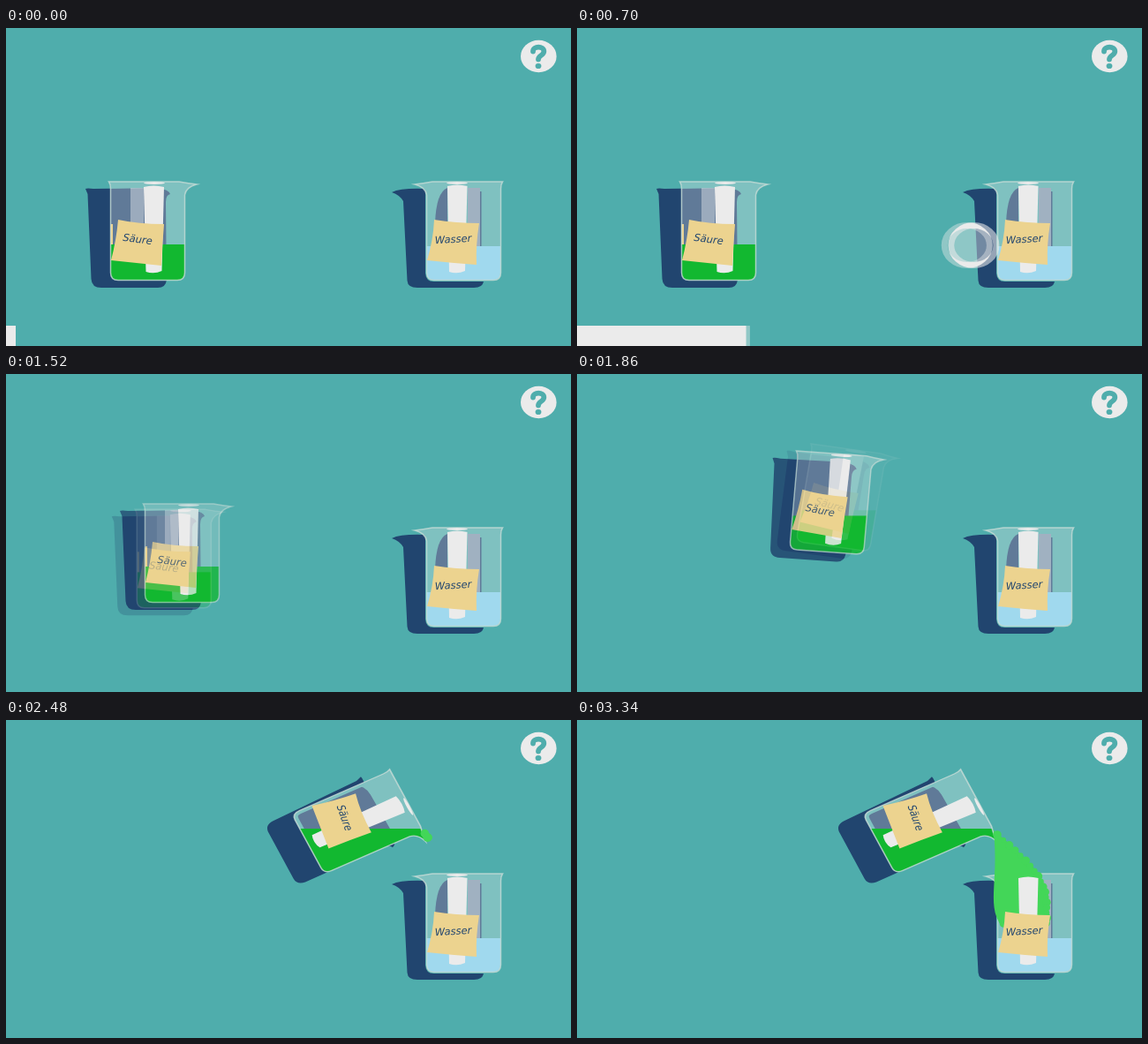
These frames come from a looping animation (640 px wide and 360 px high, 3460 ms). An HTML page with a canvas:

```html
<!DOCTYPE html>
<html lang="de">
<head>
<meta charset="utf-8">
<title>Säure und Wasser</title>
<style>
html, body { margin: 0; width: 100%; height: 100%; overflow: hidden; background: #4fadac; }
canvas { display: block; width: 100vw; height: 100vh; }
</style>
</head>
<body>
<canvas id="stage" width="640" height="360"></canvas>
<script>
const W = 640, H = 360, LOOP = 3460;
const BG = '#4fadac', NAVY = '#21456f', SLATE = '#607a98', PAPER = '#ecd38f', WHITE = '#ebebeb';
const ACID = '#12b830', POUR = '#43d658', WATER = '#a0d9ee';
const GLASS = '#7fc1c0', EDGE = 'rgba(205,222,217,.75)';
const STRETCH = 1.115;

const ctx = document.getElementById('stage').getContext('2d');
const layer = document.createElement('canvas');
layer.width = W;
layer.height = H;
const blend = layer.getContext('2d');

// The picture advances in steps of 70 ms with a few longer holds.
const holds = { 15: 130, 18: 130, 20: 130, 28: 130, 34: 130, 38: 120, 40: 120, 42: 120 };
const ticks = [0];
for (let i = 0; i < 42; i++) ticks.push(ticks[i] + (holds[i] || 70));

const glass = new Path2D('M116.500 174 L196 174 Q207 176 216 177 Q204 180 202.500 189 L202.500 277 Q202.500 285.500 194 285.500 L127 285.500 Q118.500 285.500 118.500 277 L118.500 182 Q118.500 177 116.500 174Z');
const shade = new Path2D('M115 173 Q117 172 124 173 L196 172 Q210 174 211 179 Q206 180 206 188 L207 276 Q206 285 197 285 L133 285 Q122 285 121.500 275 L117.500 179Z');
const innerShade = new Path2D('M118 196 Q120 174 140 173 L196 172 Q210 174 211 179 Q206 180 206 188 L207 285 L122 285Z');
const waterShade = new Path2D('M437 186 Q447 181 475 182 L475 278 Q476 287 484 287 L541 287 Q540 294 530 294 L466 294 Q455 294 454.500 286 L450 196 Q446 189 437 186Z');
const acidRod = new Path2D('M156 180 Q167 177 179 180 L176.500 275 Q168 279 158.500 276Z');
const waterRod = new Path2D('M500 179 Q511 176 522.500 179 L520 275 Q511 279 502 276Z');
const acidNote = new Path2D('M127 217 Q150 222 179 222 Q177 245 176 269 Q148 266 119 263 Q125 240 127 217Z');
const waterNote = new Path2D('M485 217 Q510 221 536 221 Q532 245 533 268 Q505 266 477 263 Q484 240 485 217Z');

// keys: [time, value, value, ...] rows, joined by straight segments
function track(keys, t) {
  let i = 1;
  while (i < keys.length - 1 && t > keys[i][0]) i++;
  const a = keys[i - 1], b = keys[i];
  const u = Math.min(1, Math.max(0, (t - a[0]) / (b[0] - a[0])));
  return a.slice(1).map((v, k) => v + (b[k + 1] - v) * u);
}

const acidMove = [
  [1380, 160, 230, 0], [1520, 199, 203, 0], [1650, 217, 183, 0], [1720, 241, 170, 1],
  [1860, 287, 146, 4.5], [2140, 385, 98, 40], [2410, 397.500, 115.500, 64]
];
const leftMove = [[70, 354], [350, 253], [503, 198]];
const rightMove = [[70, 526], [350, 485], [560, 482], [1050, 368]];

function fill(c, color, path) {
  c.fillStyle = color;
  c.fill(path);
}

function oval(c, x, y, rx, ry, color) {
  c.fillStyle = color;
  c.beginPath();
  c.ellipse(x, y, rx, ry, 0, 0, Math.PI * 2);
  c.fill();
}

function word(c, text, x, y, angle, size) {
  c.save();
  c.translate(x, y);
  c.rotate(angle);
  c.font = `italic ${size}px "DejaVu Sans", sans-serif`;
  c.textAlign = 'center';
  c.textBaseline = 'middle';
  c.fillStyle = NAVY;
  c.fillText(text, 0, 0);
  c.restore();
}

function rim(c) {
  c.strokeStyle = EDGE;
  c.lineWidth = 1.5;
  c.stroke(glass);
  oval(c, 168, 175.500, 12, 1.5, WHITE);
}

function place(c, x, y, deg) {
  c.translate(x, y);
  c.scale(STRETCH, 1);
  c.rotate(deg * Math.PI / 180);
  c.scale(1 / STRETCH, 1);
  c.translate(-160, -230);
}

function acidBeaker(c, t) {
  const [x, y, deg] = track(acidMove, t);
  const tilt = deg / 64;
  const shadow = (color, path) => {
    c.save();
    c.setTransform(1, 0, 0, 1, 0, 0);
    place(c, x - 25 - 8 * tilt, y + 9 + tilt, deg);
    fill(c, color, path);
    c.restore();
  };

  shadow(NAVY, shade);
  c.save();
  place(c, x, y, deg);
  fill(c, GLASS, glass);
  c.clip(glass);
  shadow(SLATE, innerShade);
  if (deg < 2) {
    c.fillStyle = 'rgba(235,238,240,.42)';
    c.fillRect(141, 181, 15, 64);
    c.fillStyle = PAPER;
    c.fillRect(118, 222, 3, 24);
  }
  c.strokeStyle = GLASS;
  c.lineWidth = 8 * tilt + 0.1;
  c.stroke(glass);
  // the surface stays level while the vessel tilts
  c.setTransform(1, 0, 0, 1, 0, 0);
  c.fillStyle = ACID;
  c.fillRect(0, y + 15 - 7.5 * tilt, W, 120);
  c.restore();

  c.save();
  place(c, x, y, deg);
  rim(c);
  c.translate(-6 * tilt, 1.5 * tilt);
  fill(c, WHITE, acidRod);
  c.translate(6 * tilt, -1.5 * tilt);
  fill(c, PAPER, acidNote);
  word(c, 'Säure', 149, 240, 0.13, 11.5);
  c.restore();
}

function stream(c, t) {
  const p = Math.min(1, (t - 2400) / 940);
  if (p <= 0) return;
  const yAt = s => 124 + 106 * s;
  const left = s => 472 + 1.5 * Math.sin(s * 5) + 8 * s ** 8;
  const right = s => 471 + 63 * Math.sin(Math.min(1, s / 0.78) * Math.PI / 2);
  const n = Math.max(2, Math.round(p * 18));
  c.fillStyle = POUR;
  c.beginPath();
  for (let i = 0; i <= n; i++) c.lineTo(left(p * i / n), yAt(p * i / n));
  for (let i = n; i >= 0; i--) c.lineTo(right(p * i / n), yAt(p * i / n));
  c.fill();
  for (let i = 1; i <= n; i++) {
    const s = p * i / n;
    const r = 4 + Math.sin(i * 2.3);
    oval(c, right(s) - 2, yAt(s), r, r, POUR);
  }
  for (let x = left(p) + 5, k = 0; x < right(p) - 2; x += 8, k++) {
    const r = 5 + Math.sin(k * 1.9);
    oval(c, x, yAt(p), r, r, POUR);
  }
}

function waterBeaker(c, t) {
  fill(c, NAVY, waterShade);
  c.save();
  c.translate(679, 0);
  c.scale(-1, 1);
  fill(c, GLASS, glass);
  c.restore();

  fill(c, SLATE, new Path2D('M500 181 Q487 186 486 222 L500 222Z'));
  c.fillStyle = SLATE;
  c.fillRect(536, 185, 2.5, 62);
  c.fillStyle = '#a0b1c1';
  c.fillRect(523, 181, 14, 66);
  fill(c, WATER, new Path2D('M476.500 247 H560 V277 Q560 285 552 285 H485 Q476.500 285 476.500 277Z'));

  c.save();
  c.translate(679, 0);
  c.scale(-1, 1);
  rim(c);
  c.restore();
  stream(c, t);
  fill(c, WHITE, waterRod);
  fill(c, PAPER, waterNote);
  word(c, 'Wasser', 506.500, 240, -0.06, 11.5);
}

function ring(c, x, y, alpha) {
  c.save();
  c.globalAlpha = alpha;
  oval(c, x, y, 22, 20, 'rgba(235,238,238,.4)');
  c.strokeStyle = WHITE;
  c.lineWidth = 7;
  c.beginPath();
  c.ellipse(x, y, 25.500, 22.500, 0, 0, Math.PI * 2);
  c.stroke();
  c.restore();
}

function help(c) {
  oval(c, 603.300, 32, 20.300, 18.200, WHITE);
  c.strokeStyle = BG;
  c.lineWidth = 5.8;
  c.lineCap = 'round';
  c.stroke(new Path2D('M597 26.500 C597 20 609.300 20 609.300 26.500 C609.300 31 603 31 603 35.500'));
  oval(c, 603, 43, 3.4, 3.1, BG);
}

function barWidth(t) {
  const u = t / 350;
  return u < 1 ? 11 + 225 * u - 91 * u * u : 145 + (t - 350) * 0.133;
}

function scene(c, t) {
  c.fillStyle = BG;
  c.fillRect(0, 0, W, H);
  help(c);
  acidBeaker(c, t);
  waterBeaker(c, t);
  if (t < 1180) {
    c.fillStyle = WHITE;
    c.fillRect(0, 337, barWidth(t), 23);
    if (t >= 70) {
      ring(c, track(rightMove, t)[0], 246, t < 560 ? 0.72 : 1);
      if (t < 700) ring(c, track(leftMove, t)[0], 210, 1);
    }
  }
}

// neighbouring moments bleed into each other while things move
function bleed(t) {
  if (t >= 70 && t <= 1050) return [33, 0.42];
  if (t > 1380 && t < 1600) return [-33, 0.25];
  if (t >= 1600 && t < 2400) return [33, 0.14];
  return [0, 0];
}

function draw(now) {
  const time = Math.max(0, now - start) % LOOP;
  let t = 0;
  for (const tick of ticks) if (tick <= time) t = tick;
  scene(ctx, t);
  const [shift, alpha] = bleed(t);
  if (alpha) {
    scene(blend, t + shift);
    ctx.globalAlpha = alpha;
    ctx.drawImage(layer, 0, 0);
    ctx.globalAlpha = 1;
  }
  requestAnimationFrame(draw);
}

const start = performance.now();
draw(start);
</script>
</body>
</html>
```
